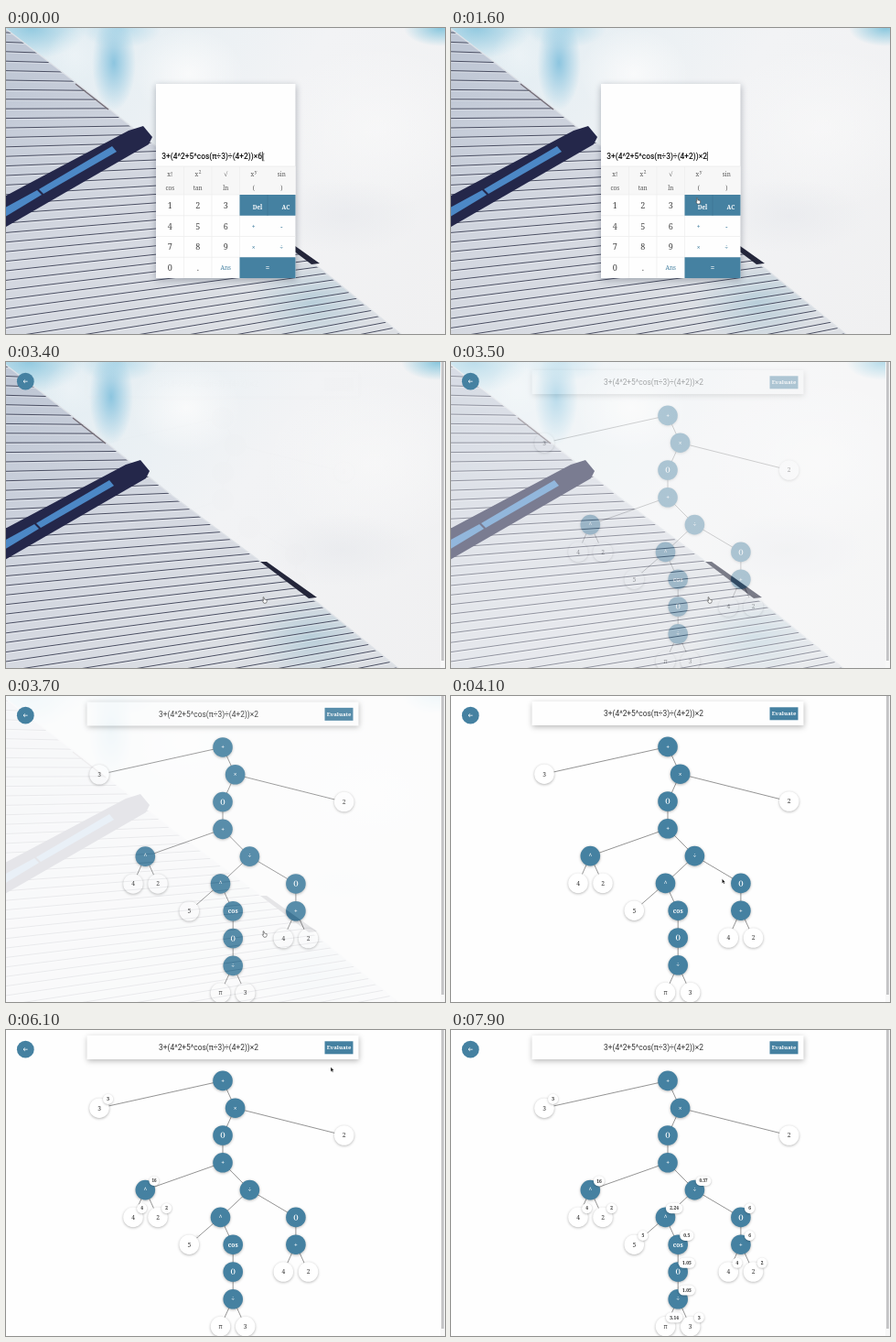
Animation, 480 px wide and 334 px high, one loop 8000 ms. Source, as an HTML page with a canvas:

```html
<!DOCTYPE html>
<html lang="en">
<head>
<meta charset="utf-8">
<title>Expression tree calculator</title>
<style>
html, body { margin: 0; width: 100%; height: 100%; overflow: hidden; background: #fff; }
canvas { display: block; width: 480px; height: 334px; }
</style>
</head>
<body>
<canvas id="stage"></canvas>
<script>
const W = 480, H = 334, LOOP = 8000;
const BLUE = '#4581a1', SLAB = '"Noto Serif", serif', SANS = 'Roboto, sans-serif';
const ratio = window.devicePixelRatio || 1;

function prepare(canvas) {
  canvas.width = W * ratio;
  canvas.height = H * ratio;
  const context = canvas.getContext('2d');
  context.scale(ratio, ratio);
  return context;
}

const stage = prepare(document.getElementById('stage'));
const backdrop = document.createElement('canvas');
let ctx = prepare(backdrop);

const clamp = v => Math.max(0, Math.min(1, v));
const easeOut = v => 1 - (1 - clamp(v)) ** 2;
const smooth = v => v * v * (3 - 2 * v);

function text(str, x, y, size, color, { font = SLAB, weight = 400, align = 'center' } = {}) {
  ctx.font = `${weight} ${size}px ${font}`;
  ctx.textAlign = align;
  ctx.fillStyle = color;
  ctx.fillText(str, x, y + size * 0.35);
}

function rect(x, y, w, h, color) {
  ctx.fillStyle = color;
  ctx.fillRect(x, y, w, h);
}

function poly(points, fill) {
  ctx.beginPath();
  points.forEach(([x, y]) => ctx.lineTo(x, y));
  ctx.closePath();
  ctx.fillStyle = fill;
  ctx.fill();
}

function line(x1, y1, x2, y2, color, width) {
  ctx.beginPath();
  ctx.moveTo(x1, y1);
  ctx.lineTo(x2, y2);
  ctx.strokeStyle = color;
  ctx.lineWidth = width;
  ctx.stroke();
}

function circle(x, y, r, color) {
  ctx.beginPath();
  ctx.arc(x, y, r, 0, Math.PI * 2);
  ctx.fillStyle = color;
  ctx.fill();
}

function withShadow(color, blur, dy, draw) {
  ctx.save();
  ctx.shadowColor = color;
  ctx.shadowBlur = blur * ratio;
  ctx.shadowOffsetY = dy * ratio;
  draw();
  ctx.restore();
}

function glow(x, y, rx, ry, rgb, alpha) {
  ctx.save();
  ctx.translate(x, y);
  ctx.scale(rx, ry);
  const g = ctx.createRadialGradient(0, 0, 0, 0, 0, 1);
  g.addColorStop(0, `rgba(${rgb},${alpha})`);
  g.addColorStop(1, `rgba(${rgb},0)`);
  circle(0, 0, 1, g);
  ctx.restore();
}

function gradient(x1, y1, x2, y2, ...colors) {
  const g = ctx.createLinearGradient(x1, y1, x2, y2);
  colors.forEach((c, i) => g.addColorStop(i / (colors.length - 1), c));
  return g;
}

// Backdrop: cloudy sky behind a slatted roof.
const ridge = [[0, 1], [90, 70], [185, 146], [283, 219], [343, 262], [434, 336]];

function drawBackdrop() {
  rect(0, 0, W, H, gradient(0, 0, W, H, '#dfecf2', '#f2f3f5', '#f0f0f1'));
  glow(28, 0, 60, 34, '120,190,218', 0.75);
  glow(118, 38, 24, 52, '125,190,220', 0.85);
  glow(125, 0, 45, 22, '150,205,228', 0.6);
  glow(75, 30, 30, 30, '240,245,248', 0.6);
  glow(475, 0, 40, 20, '110,188,216', 0.8);
  glow(405, 110, 120, 90, '250,250,250', 0.6);
  glow(370, 205, 85, 40, '230,232,236', 0.6);
  glow(200, 50, 60, 50, '252,252,252', 0.8);

  poly([[-5, -3], ...ridge, [-5, 336]],
    gradient(0, 40, 220, 334, '#bfc7d5', '#d3d7e0', '#dcdfe4'));
  ctx.save();
  ctx.clip();
  glow(335, 300, 70, 45, '170,200,214', 0.7);
  // The slats fan out, tilting upwards more the lower they lie.
  for (let i = 0; i < 42; i++) {
    const y = 5 + i * 10.4;
    const end = y + 440 * (0.05 - y * 0.0006);
    line(0, y, 440, end, '#4a4e62', 1);
    line(0, y + 1.3, 440, end + 1.3, 'rgba(255,255,255,.4)', 0.8);
  }
  ctx.restore();
  for (let i = 1; i < ridge.length; i++) {
    line(...ridge[i - 1], ...ridge[i], '#dfe3e8', 1.3);
  }
  line(76, 61, 112, 89, '#766f78', 1.4);
  poly([[0, 183], [134, 112], [150, 107], [160, 119], [156, 127], [0, 217]], '#24274a');
  poly([[36, 176], [116, 129], [121, 135], [41, 181]], '#4c88c6');
  poly([[-1, 196], [34, 177], [39, 182], [-1, 206]], '#4c88c6');
  poly([[281, 218], [288, 218], [343, 257], [334, 258]], '#24263a');
}

// Calculator
const CARD = { x: 164, y: 61, w: 152.5, h: 212 };
const KEY = { w: 30.5, h: 22.75, top: 182 };
const columnX = i => CARD.x + KEY.w * (i + 0.5);
const functionRows = [['x!', 'x^2', '√', 'x^y', 'sin'], ['cos', 'tan', 'ln', '(', ')']];
const digitRows = ['123', '456', '789', '0.'];
const expression = last => '3+(4^2+5^cos(π÷3)÷(4+2))×' + last;

function functionLabel(label, x, y) {
  const [base, power] = label.split('^');
  text(base, power ? x - 1.3 : x, y, base === '√' ? 7.4 : 6.4, '#555');
  if (power) text(power, x + 2.4, y - 2.2, 4.8, '#555');
}

function drawCalculator(t, mouse) {
  const { x, y, w, h } = CARD;
  withShadow('rgba(30,40,60,.33)', 7, 2, () => rect(x, y, w, h, '#fefefe'));
  rect(x, 151, w, 31, '#f7f7f7');
  line(x, 151, x + w, 151, '#e8e8e8', 0.7);

  const entry = expression(t < 200 ? '6' : t < 500 ? '' : '2');
  text(entry, 170.3, 140, 8.4, '#111', { font: SANS, weight: 500, align: 'left' });
  const caretX = 170.3 + ctx.measureText(entry).width;
  if (t < 500 || (t - 500) % 1000 < 500) rect(caretX, 135, 0.8, 10, '#222');

  functionRows.forEach((row, r) => row.forEach((label, c) =>
    functionLabel(label, columnX(c), 159.5 + r * 15.3)));

  const hoverColumn = Math.floor((mouse.x - 2 - x) / KEY.w);
  const hoverRow = Math.floor((mouse.y - 5 - KEY.top) / KEY.h);
  digitRows.forEach((row, r) => [...row].forEach((digit, c) => {
    if (r === hoverRow && c === hoverColumn) {
      rect(x + c * KEY.w, KEY.top + r * KEY.h, KEY.w, KEY.h, '#f3f3f3');
    }
    text(digit, columnX(c), KEY.top + r * KEY.h + 11.8, 9, '#444');
  }));
  for (let c = 1; c < 4; c++) line(x + c * KEY.w, 151, x + c * KEY.w, 273, '#ececec', 0.7);
  for (let r = 0; r < 4; r++) {
    const top = KEY.top + r * KEY.h;
    line(x, top, x + w, top, '#ececec', 0.7);
  }

  rect(255.5, 182, 61, KEY.h, BLUE);
  rect(255.5, 250.25, 61, KEY.h, BLUE);
  line(286, 182, 286, 204.75, '#3d7593', 0.6);
  text('Del', 275, 196, 6.3, '#fff', { weight: 600 });
  text('AC', 306, 196, 6.3, '#fff', { weight: 600 });
  text('=', 286, 262, 8, '#fff', { weight: 700 });
  text('Ans', columnX(2), 262, 6.4, BLUE, { weight: 500 });
  ['+', '-', '×', '÷'].forEach((op, i) =>
    text(op, columnX(3 + i % 2), 216.5 + (i >> 1) * KEY.h, 6.8, BLUE, { weight: 700 }));
}

// Tree nodes in evaluation order: label, x, row, parent index, value.
const nodes = [
  ['3', 102, 1, 17, '3'], ['4', 139, 5, 3, '4'], ['2', 166, 5, 3, '2'],
  ['^', 152.3, 4, 18, '16'], ['5', 200.3, 6, 10, '5'], ['π', 234.5, 9, 7, '3.14'],
  ['3', 261.7, 9, 7, '3'], ['÷', 248.2, 8, 8, '1.05'], ['()', 248.2, 7, 9, '1.05'],
  ['cos', 248.2, 6, 10, '0.5'], ['^', 234.5, 5, 15, '2.24'], ['4', 303.3, 7, 13, '4'],
  ['2', 330.5, 7, 13, '2'], ['+', 316.9, 6, 14, '6'], ['()', 316.9, 5, 15, '6'],
  ['÷', 266.4, 4, 18, '0.37'], ['×', 250.6, 1, 17], ['+', 237, 0],
  ['+', 237, 3, 19], ['()', 237, 2, 16], ['2', 369.7, 2, 16]
].map(([label, x, row, parent, value]) =>
  ({ label, x, y: 55.4 + row * 29.8, parent, value, leaf: /^[\dπ]$/.test(label) }));

const OPEN_AT = 3400, EVALUATE_AT = 5475, BADGE_GAP = 150;

function drawBadge(node, index, t) {
  const size = easeOut((t - EVALUATE_AT - index * BADGE_GAP) / 250);
  if (!size) return;
  ctx.save();
  ctx.translate(node.x + 9.6, node.y - 9.8);
  ctx.scale(size, size);
  const half = Math.max(5.6, node.value.length * 1.6 + 2.8);
  withShadow('rgba(0,0,0,.28)', 2.5, 0.7, () => {
    ctx.beginPath();
    ctx.roundRect(-half, -5.6, half * 2, 11.2, 5.6);
    ctx.fillStyle = '#fff';
    ctx.fill();
  });
  text(node.value, 0, 0, 4.9, '#222', { weight: 700 });
  ctx.restore();
}

function drawTree(t) {
  withShadow('rgba(0,0,0,.27)', 6, 1.5, () => rect(88.5, 6, 297, 26, '#fefefe'));
  text(expression('2'), 221.5, 19.3, 8.4, '#333', { font: SANS });
  rect(348.5, 12.3, 31, 14, BLUE);
  text('Evaluate', 364, 19.2, 6, '#fff', { weight: 600 });

  for (const node of nodes) {
    const parent = nodes[node.parent];
    if (parent) line(parent.x, parent.y, node.x, node.y, '#666', 0.7);
  }
  for (const { label, x, y, leaf } of nodes) {
    withShadow('rgba(0,0,0,.3)', 3, 0.8, () => circle(x, y, 10.8, leaf ? '#fff' : BLUE));
    text(label, x, y, 6.7, leaf ? '#333' : '#fff', { weight: leaf ? 400 : 600 });
  }
  nodes.forEach((node, i) => node.value && drawBadge(node, i, t));
}

function drawTreePage(t) {
  const shown = easeOut((t - OPEN_AT) / 450);
  rect(0, 0, W, H, '#fefefe');
  ctx.save();
  ctx.translate(0, 5 * (1 - shown));
  drawTree(t);
  ctx.restore();

  // The page fades in as one layer, so the backdrop is laid over it.
  ctx.globalAlpha = 1 - shown;
  ctx.drawImage(backdrop, -3, 0, W, H);
  ctx.globalAlpha = 1;

  circle(21.3, 21.2, 9.4, BLUE);
  line(19, 21.2, 23.6, 21.2, '#fff', 0.8);
  line(19, 21.2, 20.8, 19.5, '#fff', 0.8);
  line(19, 21.2, 20.8, 22.9, '#fff', 0.8);
  rect(475, 0, 5, H, '#f8f8f8');
  rect(476, 0, 2.8, 326, '#c3c3c5');
}

// Pointer: time, x, y
const route = [
  [0, 281, 141], [900, 281, 141], [1700, 270, 191], [2000, 270, 191], [2600, 226, 209],
  [2900, 226, 209], [3300, 283, 260], [3850, 283, 260], [4600, 338, 38],
  [4950, 361, 21], [5250, 361, 21], [5700, 356, 43], [8000, 356, 43]
];

function pointerAt(t) {
  const i = route.findIndex(stop => stop[0] > t);
  const [t0, x0, y0] = route[i - 1], [t1, x1, y1] = route[i];
  const p = smooth((t - t0) / (t1 - t0));
  return { x: x0 + (x1 - x0) * p, y: y0 + (y1 - y0) * p };
}

function drawPointer(t, { x, y }) {
  if (t >= 7050) return;
  ctx.save();
  ctx.translate(x, y);
  const onPage = t >= 3850;
  const onButton = onPage ? x > 348.5 && y < 26.5 : y > 151;
  if (!onPage && y < 151) {
    line(0.3, -3.5, 0.3, 3.5, '#444', 0.6);
    line(-1, -3.8, 1.6, -3.8, '#444', 0.6);
    line(-1, 3.8, 1.6, 3.8, '#444', 0.6);
  } else {
    const shape = onButton
      ? [[-2, -3.2], [-1, -3.2], [-0.6, -1], [2.2, -0.4], [2.1, 1.8], [1.3, 3.2],
         [-1.1, 3.2], [-2.7, 0.7], [-2.4, 0.2], [-1.5, 0.7]]
      : [[-1, -2.6], [-1, 2.5], [0.2, 1.5], [1, 3.2], [1.9, 2.8], [1.1, 1.2], [2.6, 1.1]];
    poly(shape, onButton ? '#fff' : '#111');
    ctx.strokeStyle = onButton ? '#444' : '#fff';
    ctx.lineWidth = onButton ? 0.6 : 0.35;
    ctx.stroke();
  }
  ctx.restore();
}

function render(now) {
  const t = now % LOOP;
  const mouse = pointerAt(t);
  if (t < OPEN_AT) {
    ctx.drawImage(backdrop, 0, 0, W, H);
    drawCalculator(t, mouse);
  } else {
    drawTreePage(t);
  }
  drawPointer(t, mouse);
}

drawBackdrop();
ctx = stage;

const start = performance.now();
function tick() {
  render(performance.now() - start);
  requestAnimationFrame(tick);
}
tick();
</script>
</body>
</html>
```
